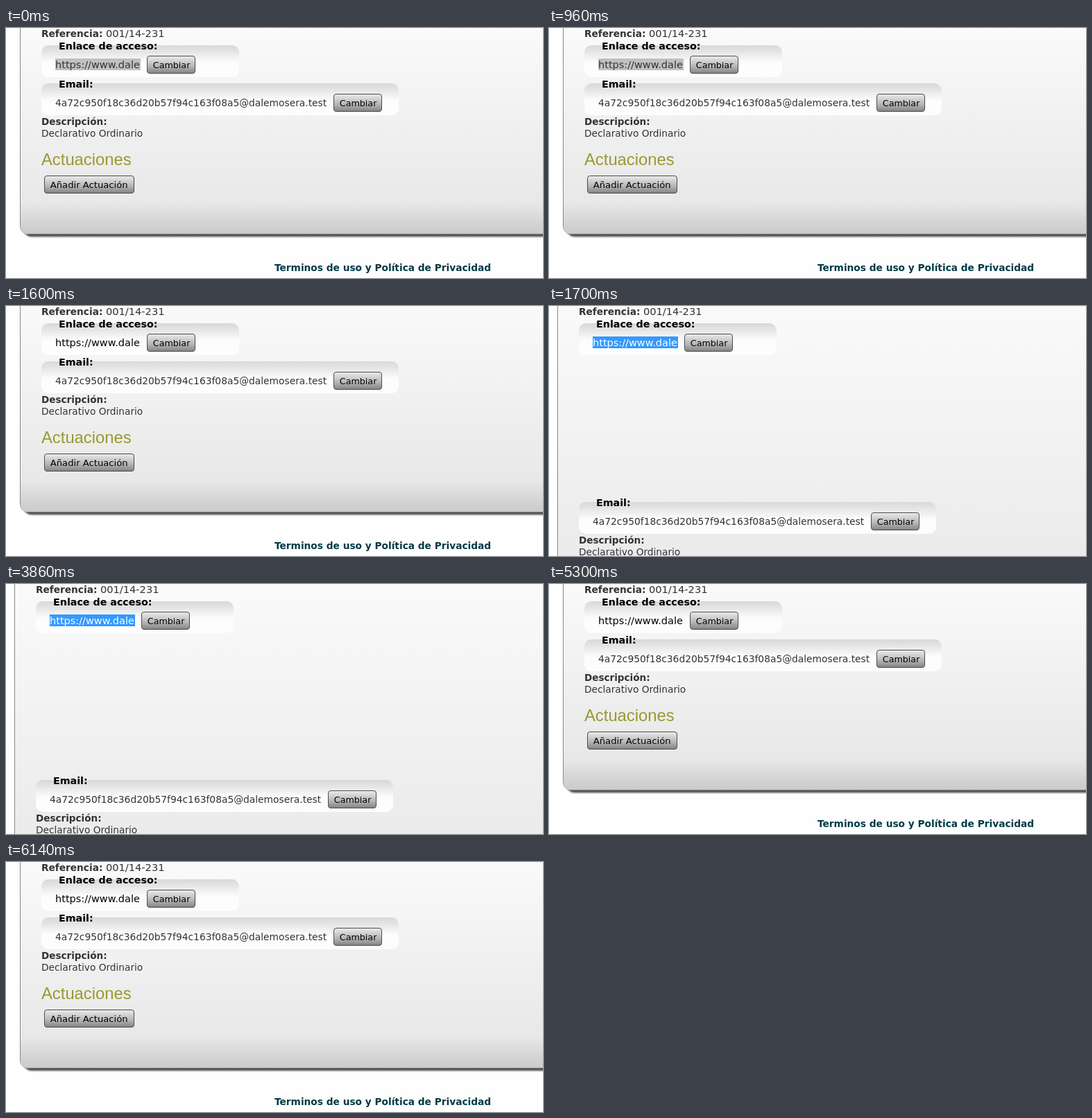
Animation of 774 by 361 pixels, one loop 6.7 s. Source, as an HTML page with a canvas:

```html
<!DOCTYPE html>
<html lang="es">
<head>
<meta charset="utf-8">
<title>Expediente</title>
<style>
  html, body { margin: 0; width: 100%; height: 100%; overflow: hidden; background: #fefefe; }
  canvas { display: block; }
</style>
</head>
<body>
<canvas id="stage" width="774" height="361"></canvas>
<script>
const WIDTH = 774, HEIGHT = 361, LOOP = 6700;
const SANS = '"DejaVu Sans", Verdana, sans-serif';
const ctx = document.getElementById('stage').getContext('2d');

const SELECTION = {
  dimmed: { back: '#c0c0c0', ink: '#333' },
  none: { back: null, ink: '#000' },
  active: { back: '#3399ff', ink: '#fff' }
};

function gradient(y0, y1, stops) {
  const fill = ctx.createLinearGradient(0, y0, 0, y1);
  for (const [at, color] of stops) fill.addColorStop(at, color);
  return fill;
}

function roundBox(x, y, w, h, r, fill, stroke) {
  ctx.beginPath();
  ctx.roundRect(x, y, w, h, r);
  ctx.fillStyle = fill;
  ctx.fill();
  if (stroke) {
    ctx.strokeStyle = stroke;
    ctx.lineWidth = 1;
    ctx.stroke();
  }
}

function text(str, x, y, size, color = '#333', weight = 'normal', family = SANS) {
  ctx.font = `${weight} ${size}px ${family}`;
  ctx.fillStyle = color;
  ctx.fillText(str, x, y);
}

const bold = (str, x, y, size, color) => text(str, x, y, size, color, 'bold');

function button(label, x, y, w, size) {
  const fill = gradient(y, y + 26, [[0, '#ececec'], [0.25, '#d6d6d6'], [0.6, '#b4b4b4'], [1, '#808080']]);
  roundBox(x + 0.5, y + 0.5, w - 1, 25, 3.5, fill, '#4c4c4c');
  text(label, x + 8.8, y + 18, size, '#000');
}

function fieldset(title, y, w) {
  const fill = gradient(y, y + 46, [[0, '#d8d8d8'], [0.22, '#e6e6e6'], [0.5, '#fafafa'], [0.6, '#fdfdfd'], [1, '#fdfdfd']]);
  roundBox(51, y, w, 46, 10, fill);
  bold(title, 76, y + 6, 14.25, '#000');
}

function panel(bottom) {
  ctx.save();
  ctx.filter = 'blur(0.8px)';
  roundBox(25, -40, 800, bottom + 43.5, 12, '#505050');
  ctx.restore();
  const fill = gradient(0, bottom, [[0, '#fafafa'], [1, '#e5e5e5']]);
  roundBox(20.5, -40, 800, bottom + 39.5, 11, fill, '#888');
  ctx.save();
  ctx.clip();
  ctx.fillStyle = gradient(bottom - 46, bottom, [[0, 'rgba(202,202,202,0)'], [1, '#cacaca']]);
  ctx.fillRect(21, bottom - 46, 800, 45);
  ctx.restore();
}

function link(selection) {
  ctx.save();
  ctx.beginPath();
  ctx.rect(71, 43, 123, 20);
  ctx.clip();
  if (selection.back) {
    ctx.fillStyle = selection.back;
    ctx.fillRect(71, 44, 123, 17);
  }
  text('https://www.dale', 71, 58, 14.5, selection.ink);
  ctx.restore();
}

// Opening the access section pushes everything below it down by `gap`.
function drawPage(selection, shiftX, gap) {
  ctx.fillStyle = '#fefefe';
  ctx.fillRect(0, 0, WIDTH, HEIGHT);
  ctx.save();
  ctx.translate(shiftX, 0);
  panel(298 + gap);

  bold('Referencia:', 51, 13, 13.7, '#333');
  text('001/14-231', 144, 13, 14.6);
  fieldset('Enlace de acceso:', 25, 285);
  link(selection);
  button('Cambiar', 203, 40, 70, 12.7);

  ctx.translate(0, gap);
  fieldset('Email:', 80, 515);
  text('4a72c950f18c36d20b57f94c163f08a5@dalemosera.test', 71, 113, 13.82);
  button('Cambiar', 472, 95, 70, 12.7);
  bold('Descripción:', 51, 140, 13.55, '#333');
  text('Declarativo Ordinario', 51, 157, 13.7);
  text('Actuaciones', 51, 198, 23.8, '#999933', 'normal', '"Liberation Sans", Arial, sans-serif');
  button('Añadir Actuación', 55, 213, 130, 13.15);
  bold('Terminos de uso y Política de Privacidad', 387, 351, 13.72, '#003a46');
  ctx.restore();
}

function render(now) {
  const t = now % LOOP;
  if (t < 1600) drawPage(SELECTION.dimmed, 0, 0);
  else if (t < 1700 || t >= 5300) drawPage(SELECTION.none, 0, 0);
  else drawPage(SELECTION.active, -8, 203);
}

const start = performance.now();
function tick() {
  render(performance.now() - start);
  requestAnimationFrame(tick);
}
tick();
</script>
</body>
</html>
```
